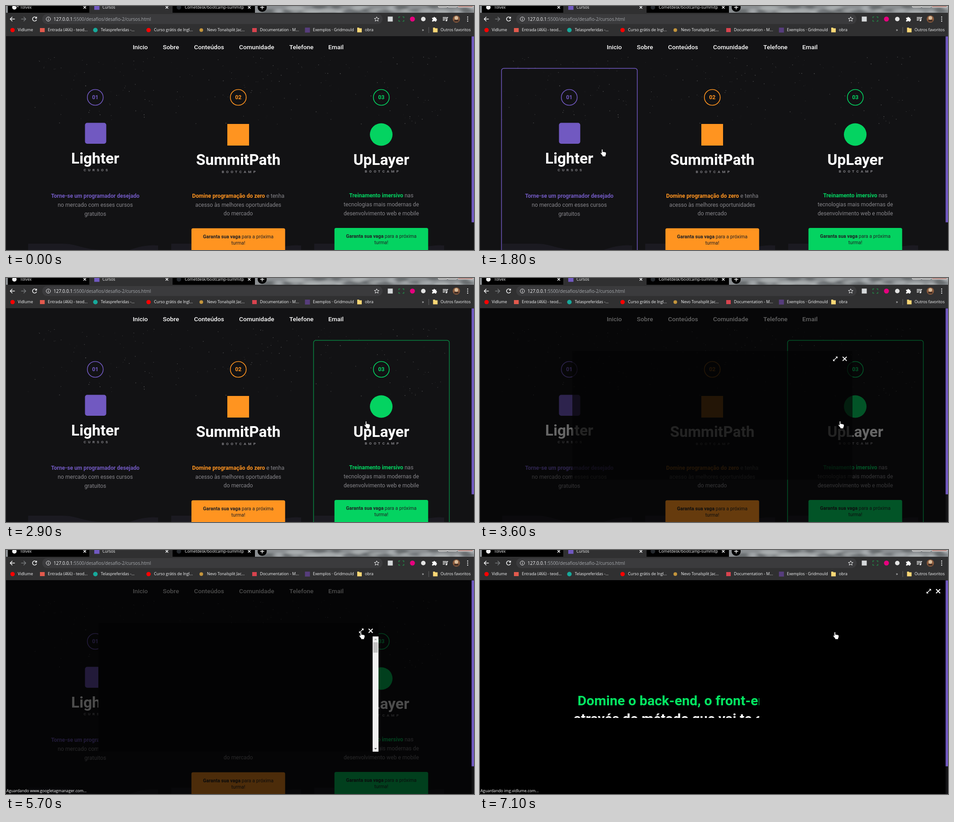
These frames come from a looping animation (1034x542 px, 8 s). An HTML page:

```html
<!DOCTYPE html>
<html lang="pt">
<head>
<meta charset="utf-8">
<title>Cursos</title>
<style>
html, body { margin: 0; width: 100%; height: 100%; overflow: hidden; background: #121214; }
svg { display: block; }
text { font-family: Roboto, sans-serif; white-space: pre; }
.ui { font-family: "Open Sans", sans-serif; }
.b { font-weight: 700; }
.m { font-weight: 500; }
.line { fill: none; stroke-width: 1.5; }
</style>
</head>
<body>
<svg id="stage" width="1034" height="542" viewBox="0 0 1034 542"></svg>
<script>
const LOOP = 8000;
const PURPLE = '#7159c1', ORANGE = '#ff9420', GREEN = '#04d361', GREY = '#87868b';
const BAR = '#303031', PALE = '#f6f7f8';

const text = (x, y, size, fill, str, attrs = '') =>
  `<text x="${x}" y="${y}" font-size="${size}" fill="${fill}" ${attrs}>${str}</text>`;
const ui = (x, y, str, size = 8.8, fill = PALE) => text(x, y, size, fill, str, 'class="ui"');
const mid = (x, y, size, fill, str, attrs = '') =>
  text(x, y, size, fill, str, 'text-anchor="middle" ' + attrs);
const rect = (x, y, w, h, fill, attrs = '') =>
  `<rect x="${x}" y="${y}" width="${w}" height="${h}" fill="${fill}" ${attrs}/>`;
const dot = (x, y, r, fill, attrs = '') =>
  `<circle cx="${x}" cy="${y}" r="${r}" fill="${fill}" ${attrs}/>`;
const line = (d, stroke = PALE, attrs = '') =>
  `<path class="line" d="${d}" stroke="${stroke}" ${attrs}/>`;
const cross = (x, y, r) => line(`M${x - r} ${y - r}l${2 * r} ${2 * r}m0 ${-2 * r}l${-2 * r} ${2 * r}`);
const bold = (str, fill) => `<tspan class="b" fill="${fill}">${str}</tspan>`;
const folder = x => `<path d="M${x} 48h4l1 1.5h5v9h-10z" fill="#fbd775"/>`;

let seed = 7;
const rnd = () => (seed = seed * 16807 % 2147483647) / 2147483647;

function stars() {
  let out = '';
  for (let i = 0; i < 240; i++) {
    const x = 49 + 316 * (i % 3) + rnd() * 290, y = 112 + rnd() ** 1.2 * 155;
    out += dot(x.toFixed(1), y.toFixed(1), (.4 + rnd() * .4).toFixed(2), '#bbb', `opacity="${(.15 + rnd() * .45).toFixed(2)}"`);
  }
  return out;
}

function wallpaper() {
  let out = '<filter id="soft"><feGaussianBlur stdDeviation="4 2"/></filter>'
    + rect(0, 0, 1034, 16, '#8b8f92') + '<g filter="url(#soft)">';
  for (let i = 0; i < 26; i++)
    out += `<ellipse cx="${585 + i * 18}" cy="${rnd() * 14}" rx="${10 + rnd() * 14}" ry="${3 + rnd() * 4}"
      fill="${i % 2 ? '#b4b8ba' : '#5b5f62'}" opacity=".7"/>`;
  return out + '</g>';
}

const cards = [
  { x: 47, color: PURPLE, name: 'Lighter', kind: 'CURSOS', y: 350, desc: 426.3,
    logo: rect(174.5, 259.5, 47, 46.5, PURPLE, 'rx="5"'),
    lines: [bold('Torne-se um programador desejado', PURPLE), 'no mercado com esses cursos', 'gratuitos'] },
  { x: 363, color: ORANGE, name: 'SummitPath', kind: 'BOOTCAMP', y: 353.4, desc: 425.8, button: 493.7,
    logo: rect(489, 262, 48, 48, ORANGE),
    lines: [bold('Domine programação do zero', ORANGE) + ' e tenha', 'acesso às melhores oportunidades', 'do mercado'] },
  { x: 679, color: GREEN, name: 'UpLayer', kind: 'BOOTCAMP', y: 353, desc: 425.2, button: 493,
    logo: dot(829, 285.5, 25, GREEN),
    lines: [bold('Treinamento imersivo', GREEN) + ' nas', 'tecnologias mais modernas de', 'desenvolvimento web e mobile'] },
];

function card(c, i) {
  const cx = c.x + 150.2;
  let out = `<path transform="translate(${c.x} 0)" fill="#1b1a21"
      d="M2 528H78c32 0 42 12 85 14H2zM226 542c24-9 45-12 63-10v10z"/>`;
  out += dot(cx, 203, 17.5, 'none', `stroke="${c.color}" stroke-width="1.6"`)
    + mid(cx, 207.4, 12.16, c.color, '0' + (i + 1), 'class="b"') + c.logo
    + mid(cx, c.y, 33.4, '#fff', c.name, 'class="b"')
    + mid(cx + 3.3, c.y + 17.2, 8, GREY, c.kind, 'class="b" letter-spacing="4.5"');
  c.lines.forEach((s, n) => out += mid(cx, c.desc + n * 19.8, 12.16, GREY, s));
  if (c.button) out += rect(cx - 103.5, c.button, 207, 60, c.color, 'rx="3.5"')
    + mid(cx, c.button + 22.2, 10.64, '#202024', bold('Garanta sua vaga', '#202024') + ' para a próxima')
    + mid(cx, c.button + 36, 10.64, '#202024', 'turma!');
  return out + `<rect class="line" id="edge${i}" x="${c.x + .5}" y="138.5" width="300" height="440" rx="5" stroke="${c.color}"/>`;
}

const nav = [[280, 'Inicio'], [346.5, 'Sobre'], [415.5, 'Conteúdos'], [515, 'Comunidade'], [626, 'Telefone'], [712, 'Email']]
  .map(([x, s]) => text(x, 95.6, 13.68, '#fff', s, 'class="m"')).join('');

const tabStrip = () => wallpaper()
  + rect(4, 0, 181, 15, '#000') + rect(368, 0, 182, 15, '#000')
  + rect(184, 0, 184, 16, BAR)
  + dot(18.5, 3, 5, '#f1f1f1') + ui(31, 6, 'Tolvex') + cross(174, 3, 2.8)
  + rect(195, -3, 11.5, 11.5, PURPLE) + ui(213, 6, 'Cursos') + cross(355.5, 3, 2.8)
  + dot(382, 3, 5, '#25292e')
  + `<svg x="395" y="0" width="131" height="14">${ui(0, 6, 'Cometdesk/bootcamp-summitpat')}</svg>` + cross(537.5, 3, 2.8)
  + dot(566, 3, 10, '#000') + line('M561.5 3h9M566 -2v9.5')
  + rect(955, -5, 20, 8, '#aaa', 'rx="2" stroke="#ddd"') + rect(976, -5, 20, 8, '#aaa', 'rx="2" stroke="#ddd"')
  + rect(998, -5, 34, 8, '#b58a84', 'rx="2" stroke="#ddd"');

const toolbar = rect(0, 15, 1034, 52, BAR)
  + line('M19.5 29h-10m4.5-4.7L9.3 29l4.7 4.7')
  + line('M33.5 29h10m-4.5-4.7L43.7 29l-4.7 4.7', '#77797c')
  + line('M66.8 26a4.6 4.6 0 1 0 .8 4.3M67.6 23.8v3.4h-3.4')
  + rect(80, 18, 752, 22, '#3b3b3d', 'rx="11"')
  + dot(93.5, 29, 4.7, 'none', `stroke="${PALE}"`) + line('M93.5 28.3v3.5M93.5 26v1.2', PALE, 'style="stroke-width:1.1"')
  + ui(105, 32.6, '127.0.0.1<tspan fill="#a5a8ac">:5500/desafios/desafio-2/cursos.html</tspan>', 10)
  + line('M819 24l1.5 3.4 3.7.3-2.8 2.4.9 3.6-3.3-2-3.3 2 .9-3.6-2.8-2.4 3.7-.3z', PALE, 'style="stroke-width:1"')
  + rect(843.5, 23.5, 11, 11, '#d5d8da')
  + line('M868 27v-3h3m5 0h3v3m0 4v3h-3m-5 0h-3v-3', '#1f9a4c', 'style="stroke-width:1.2"')
  + dot(898, 29, 5.5, '#e6007e') + dot(922, 29, 5, '#e3e3e3')
  + `<path d="M941.5 26h3a1.7 1.7 0 1 1 3.4 0h2.6v3a1.7 1.7 0 1 1 0 3.4v2.1h-3a1.5 1.5 0 0 0-3 0h-3v-3a1.5 1.5 0 0 0 0-3z" fill="#fff"/>`
  + line('M965 25.5h8M965 28.5h8M965 31.5h4.5M974.3 32v-6.5h2.5') + dot(973, 32.3, 1.8, PALE)
  + dot(995, 29, 8, '#8a5a3c') + dot(995, 26.5, 4, '#d9bd9c') + rect(990, 31, 10, 3.5, '#3b2b25', 'rx="2"')
  + [24.5, 29, 33.5].map(y => dot(1020, y, 1.2, PALE)).join('');

const bookmarks = dot(14.5, 53.5, 4.8, '#f00') + rect(75, 49, 10.5, 9, '#e35a4d') + dot(197.5, 53.5, 5, '#17a99b')
  + dot(315, 53.5, 4.8, '#f00') + dot(431.5, 53.5, 4, '#c4953c') + rect(544, 49, 10, 9, '#d8434e')
  + rect(660.5, 48, 11, 11, '#563d7c') + folder(776) + folder(943.5)
  + rect(933.5, 47, 1, 13, '#666')
  + [[26, 'Vidlume'], [92.5, 'Entrada (466) - teod...'], [209.5, 'Telaspreferidas -...'], [327, 'Curso grátis de Ingl...'],
     [444, 'Nevo Tonalsplit Jac...'], [561, 'Documentation - M...'], [678, 'Exemplos · Gridmould'],
     [793, 'obra'], [919, '»'], [960, 'Outros favoritos']].map(([x, s]) => ui(x, 56.3, s)).join('');

const stage = document.getElementById('stage');
stage.innerHTML = rect(0, 0, 1034, 542, '#121214') + stars() + nav + cards.map(card).join('')
  + rect(0, 67, 1034, 475, '#000', 'id="shade"')
  + rect(204, 162, 619, 286, '#030304', 'id="modal"')
  + `<g id="scroll">${rect(810, 192, 13, 256, '#f1f1f1')}${rect(811.5, 205, 10, 23, '#c1c1c1')}
      <path d="M813.5 200h6l-3-3z" fill="#a3a3a3"/><path d="M813.5 440h6l-3 3z" fill="#505050"/></g>`
  + rect(0, 67, 1034, 475, '#000', 'id="full"')
  + `<svg id="hero" x="204" y="300" height="73">${text(11.5, 44.7, 30.4, '#04e762', 'Domine o back-end, o front-end', 'class="b"')}
      ${text(3, 85, 30.4, '#fff', 'através do método que vai te colocar', 'class="b"')}</svg>`
  + `<g id="tools">${line('M-3.8 3.8L3.8 -3.8', '#fff')}
      <path d="M.5 -5H5V-.5zM-.5 5H-5V.5z" fill="#fff"/>
      ${line('M16.2 -4.5l9 9m0 -9l-9 9', '#fff', 'style="stroke-width:2"')}</g>`
  + rect(1028.7, 67, 5.3, 475, '#121214') + rect(1028.7, 67.5, 5.3, 413, PURPLE)
  + text(1, 538, 8.7, '#fff', '', 'id="status" class="ui"')
  + tabStrip() + toolbar + bookmarks
  + `<path id="arrow" d="M0 0v12.5l2.9-2.7 2 4.5 2-.9-2-4.3h3.9z" fill="#fff" stroke="#000" stroke-width=".7"/>
     <path id="hand" d="M-1.3 .8q1.3-1.6 2.6 0v5.2l1.5-.5 1 .7 1.6-.3 .9.9 1.4-.1 1 1.3v3.5l-1.2 2.5v2.3H.5v-1.8L-3.8 9.2q-.6-1.7 1-1.6l1.5 1.3z"
       fill="#fff" stroke="#000" stroke-width=".8"/>`;

const $ = id => document.getElementById(id);

// Linear interpolation through [time, ...values] keys.
function track(keys, t) {
  let i = 0;
  while (i < keys.length - 1 && keys[i + 1][0] <= t) i++;
  const a = keys[i], b = keys[i + 1] || a;
  const p = Math.max(0, (t - a[0]) / (b[0] - a[0] || 1));
  return a.slice(1).map((v, n) => v + (b[n + 1] - v) * p);
}

const pointer = [[0, 21, -11], [200, 23, 5], [800, 30, 262], [1000, 33, 290], [1100, 36, 307], [1200, 80, 312],
  [1600, 210, 320], [1800, 270, 318], [1900, 312, 316], [2100, 352, 318], [2300, 524, 321],
  [2900, 795.5, 318], [4100, 795.5, 318], [4200, 790, 250], [4300, 784, 182]];
const edges = [
  [[1100, 0], [1500, 1], [2100, 1], [2300, 0]],
  [[2100, 0], [2300, .38], [2500, .8], [2600, .85], [2900, 0]],
  [[2700, 0], [2900, .6], [3200, .6], [3300, 1], [4300, 1], [4700, 0]],
];
const dim = [[3200, 0, 0], [3300, .2, .2], [3400, .42, .4], [3600, .6, .67], [3800, .7, 1]];
const messages = [[0, ''], [4600, 'Conectando...'], [4900, 'Aguardando...'], [5200, 'Conectando...'],
  [5400, 'Aguardando img.vidlume.com...'], [5700, 'Aguardando www.googletagmanager.com...'],
  [6900, 'Aguardando www.vidlume.com...'], [7100, 'Aguardando img.vidlume.com...']];
const pauses = [100, 900, 1700, 2000, 2400, 3500, 3700, 4400];

function draw(now) {
  let t = Math.floor(now % LOOP / 100) * 100;
  while (pauses.includes(t)) t -= 100;

  const [x, y] = track(pointer, t), onCard = x > 47 && y > 138;
  for (const id of ['arrow', 'hand']) {
    $(id).setAttribute('transform', `translate(${x} ${y})`);
    $(id).style.display = (id === 'hand') === onCard ? '' : 'none';
  }
  edges.forEach((keys, i) => $('edge' + i).style.opacity = track(keys, t)[0]);

  const [shade, modal] = track(dim, t), full = t >= 6300;
  $('shade').style.opacity = shade;
  $('modal').style.opacity = modal;
  $('scroll').style.opacity = +(t >= 5700);
  $('full').style.opacity = +full;
  $('tools').style.opacity = Math.min(1, modal * 1.4);
  $('tools').setAttribute('transform', full ? 'translate(991.5 91.5)' : 'translate(785 179.5)');
  $('hero').setAttribute('width', t < 6500 ? 0 : t < 6900 ? 383 : 413);
  $('status').textContent = messages.filter(m => m[0] <= t).pop()[1];
  requestAnimationFrame(tick);
}

const begin = performance.now();
const tick = () => draw(performance.now() - begin);
tick();
</script>
</body>
</html>
```
